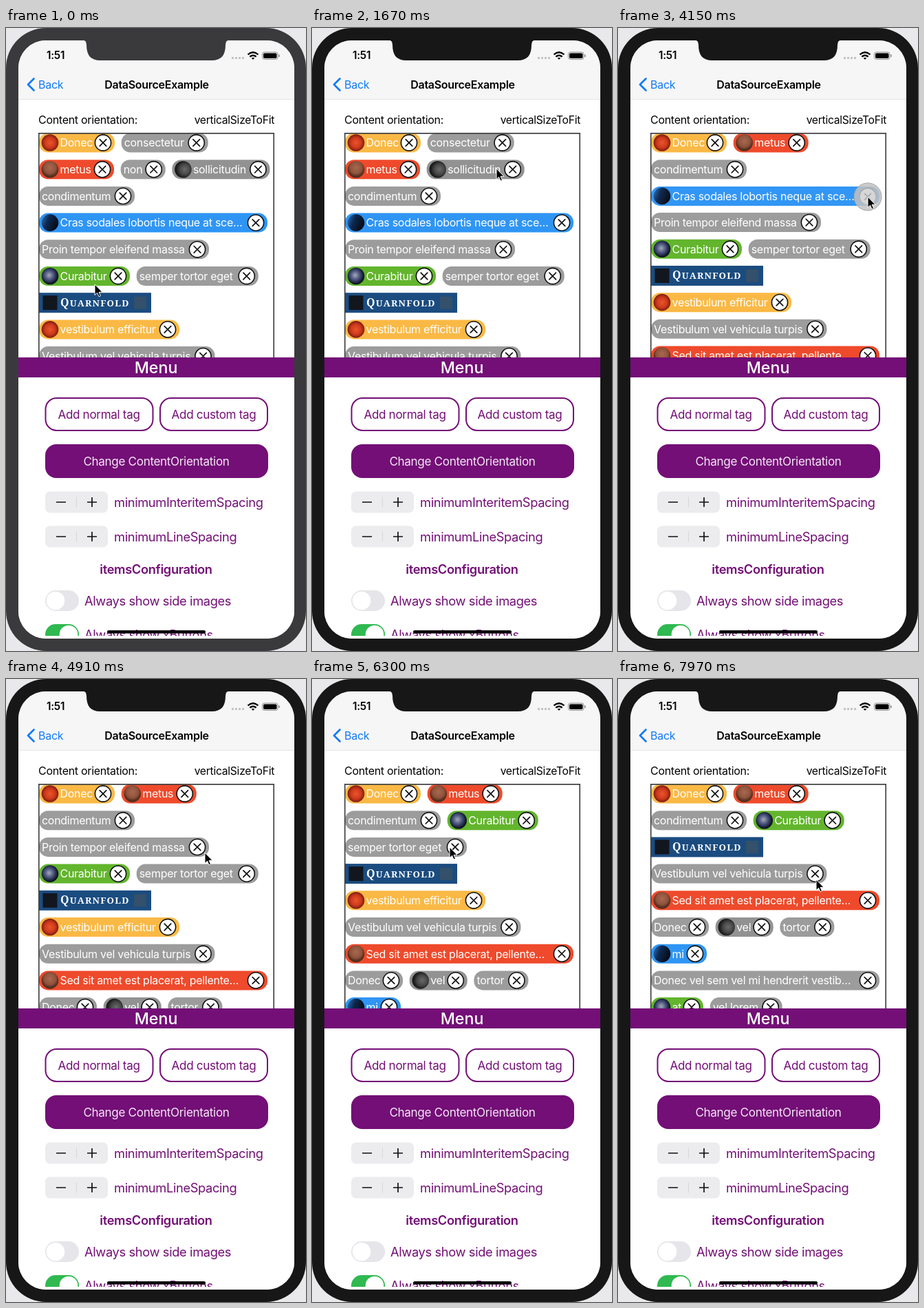
An HTML page for the animation above (8000 ms loop, 436x904 px).

```html
<!DOCTYPE html>
<html lang="en">
<head>
<meta charset="utf-8">
<title>Tag list demo</title>
<style>
  html, body { margin: 0; width: 100%; height: 100%; overflow: hidden; background: #e9e9eb; }
  svg { display: block; width: 100%; height: 100%; }
  text { font-family: Inter, Roboto, sans-serif; font-size: 16px; letter-spacing: -.018em; }
  .purple { fill: #730f76; }
  .outline { fill: none; stroke: #730f76; stroke-width: 2; }
  .button { font-size: 17.1px; letter-spacing: -.02em; text-anchor: middle; }
  .option { font-size: 18.3px; letter-spacing: -.02em; }
  .bold { font-weight: 600; }
  .mid { text-anchor: middle; }
  .tag text { fill: #fff; }
  .tag .brand { font-family: "Noto Serif", serif; font-weight: 600; font-size: 13.3px; letter-spacing: 1.2px; }
  .bezel { fill: #171718; animation: tone 8s linear infinite; }
  @keyframes tone { 0% { fill: #3a3a3c; } 10%, 100% { fill: #171718; } }
</style>
</head>
<body>
<svg viewBox="0 0 436 904" xmlns="http://www.w3.org/2000/svg">
  <defs>
    <clipPath id="screen"><rect x="18" y="18" width="401" height="868" rx="40"/></clipPath>
    <clipPath id="list"><rect x="48" y="152.5" width="341" height="326"/></clipPath>
    <clipPath id="options"><rect x="18" y="507" width="401" height="375"/></clipPath>
    <radialGradient id="sun"><stop offset="0" stop-color="#e8552c"/><stop offset=".6" stop-color="#cf3a1c"/><stop offset="1" stop-color="#7d1c10"/></radialGradient>
    <radialGradient id="mars" cy=".4"><stop offset="0" stop-color="#a8694f"/><stop offset=".7" stop-color="#8f523c"/><stop offset="1" stop-color="#54301f"/></radialGradient>
    <radialGradient id="moon" cx=".6"><stop offset="0" stop-color="#6a6a6a"/><stop offset=".6" stop-color="#474747"/><stop offset="1" stop-color="#1c1c1c"/></radialGradient>
    <linearGradient id="ice" y2=".4"><stop offset="0" stop-color="#2f78c8"/><stop offset=".45" stop-color="#0d2850"/><stop offset="1" stop-color="#070d18"/></linearGradient>
    <radialGradient id="earth" cx=".45" cy=".45"><stop offset="0" stop-color="#a6a9b8"/><stop offset=".55" stop-color="#47527c"/><stop offset="1" stop-color="#101526"/></radialGradient>
    <g id="close">
      <circle r="11.6" fill="#fff" stroke="#111" stroke-width="1.6"/>
      <path d="M-4.8-4.8 4.8 4.8M4.8-4.8-4.8 4.8" stroke="#111" stroke-width="1.7" stroke-linecap="round"/>
    </g>
    <g id="stepper">
      <rect width="91" height="31" rx="7" fill="#ececee"/>
      <path d="M45.5 8v15" stroke="#d6d6d9"/>
      <path d="M16 15.5h14M61 15.5h14M68 8.5v14" stroke="#111" stroke-width="1.7"/>
    </g>
  </defs>

  <rect width="436" height="904" fill="#e9e9eb"/>
  <rect class="bezel" width="436" height="904" rx="58"/>

  <g clip-path="url(#screen)">
    <rect x="18" y="18" width="401" height="868" fill="#fff"/>
    <rect x="18" y="18" width="401" height="85.5" fill="#f6f6f7"/>
    <path d="M18 103.5h401" stroke="#dededf" stroke-width=".7"/>
    <text class="bold" x="59" y="45" style="font-size:15.3px">1:51</text>
    <path d="M328 43.500h19" stroke="#c4c4c6" stroke-width="3" stroke-dasharray="3 2"/>
    <g fill="none" stroke="#000" stroke-width="2.3">
      <path d="M351.5 38.5q7.5-6.5 15 0M354.3 41.7q4.7-4 9.4 0"/>
      <path d="M357.3 43.5h3.4l-1.7 2z" fill="#000" stroke-width=".8"/>
    </g>
    <rect x="372.5" y="35" width="22.5" height="10.5" rx="3" fill="none" stroke="#8d8d8f"/>
    <rect x="374" y="36.5" width="19.5" height="7.5" rx="1.8" fill="#000"/>
    <path d="M397 38.5v3.5" stroke="#8d8d8f" stroke-width="1.5"/>
    <path d="M40.5 73.5 32 82l8.5 8.5" fill="none" stroke="#127af6" stroke-width="2.7" stroke-linecap="round" stroke-linejoin="round"/>
    <text x="47" y="88" fill="#127af6">Back</text>
    <text class="bold mid" x="219" y="88">DataSourceExample</text>
    <text x="47" y="138.5">Content orientation:</text>
    <text x="390" y="138.5" text-anchor="end" style="font-size:15.7px">verticalSizeToFit</text>

    <g id="tags" clip-path="url(#list)"></g>
    <path d="M47.8 479V152.8H389.2V479" fill="none" stroke="#444" stroke-width="1.7"/>

    <rect x="18" y="478" width="401" height="408" fill="#fff"/>
    <rect class="purple" x="18" y="478" width="401" height="29"/>
    <text class="mid" x="218" y="501" fill="#fff" style="font-size:23.2px;font-weight:500;letter-spacing:0">Menu</text>

    <g clip-path="url(#options)">
      <rect class="outline" x="57.5" y="537" width="156" height="47" rx="16"/>
      <rect class="outline" x="224" y="537" width="156" height="47" rx="16"/>
      <rect class="purple" x="57" y="604" width="324" height="49" rx="16"/>
      <text class="button purple" x="135" y="567">Add normal tag</text>
      <text class="button purple" x="302" y="567">Add custom tag</text>
      <text class="button" x="218.5" y="635" fill="#f4e6f5">Change ContentOrientation</text>
      <use href="#stepper" x="57" y="672.5"/>
      <use href="#stepper" x="57" y="722.5"/>
      <text class="option purple" x="157" y="694.5">minimumInteritemSpacing</text>
      <text class="option purple" x="157" y="744.5">minimumLineSpacing</text>
      <text class="option purple bold mid" x="218" y="791.5">itemsConfiguration</text>
      <rect x="57" y="816" width="49" height="30" rx="15" fill="#e5e5ea"/>
      <circle cx="72" cy="831" r="13.3" fill="#fff"/>
      <text class="option purple" x="114" y="837.5">Always show side images</text>
      <rect x="57" y="865" width="49" height="30" rx="15" fill="#2fb950"/>
      <circle cx="91" cy="880" r="13.3" fill="#fff"/>
      <text class="option purple" x="114" y="886.5">Always show xButtons</text>
    </g>
    <rect x="147" y="874" width="143" height="4.5" rx="2.2" fill="#000"/>
  </g>

  <path class="bezel" d="M111 17.5q6 0 6 7c0 15 6 22.5 20 22.5H299c14 0 20-7.5 20-22.5q0-7 6-7z"/>

  <g id="press" opacity="0">
    <circle r="20" fill="#c2c2c2" fill-opacity=".85" stroke="#a5a5a5"/>
    <circle r="11.5" fill="#dadada" fill-opacity=".8"/>
    <path d="M-4.8-4.8 4.8 4.8M4.8-4.8-4.8 4.8" stroke="#a8a8a8" stroke-width="1.6"/>
  </g>
  <path id="cursor" d="M0 0V15.5L3.6 12.2 6 17.8 8.5 16.7 6.1 11.3H11z" fill="#000" stroke="#fff"/>
</svg>

<script>
const LOOP = 8000, LEFT = 48, RIGHT = 390, FIRST_ROW = 166.5, PITCH = 38.7, GAP = 9.7, SHIFT = 300;

const kinds = {
  plain: { fill: '#9c9c9d' },
  sun:   { fill: '#fab945', image: true },
  mars:  { fill: '#ee4a2b', image: true },
  moon:  { fill: '#929293', image: true },
  ice:   { fill: '#2f95f4', image: true },
  earth: { fill: '#62b52c', image: true },
  brand: { fill: '#1b4c80' }
};

const tags = [
  ['Donec', 110, 'sun'], ['consectetur', 126, 'plain'], ['metus', 109, 'mars'],
  ['non', 65, 'plain'], ['sollicitudin', 142, 'moon'], ['condimentum', 139, 'plain'],
  ['Cras sodales lobortis neque at sce…', 332, 'ice'], ['Proin tempor eleifend massa', 247, 'plain'],
  ['Curabitur', 132, 'earth'], ['semper tortor eget', 177, 'plain'], ['Quarnfold', 163, 'brand'],
  ['vestibulum efficitur', 204, 'sun'], ['Vestibulum vel vehicula turpis', 255.5, 'plain'],
  ['Sed sit amet est placerat, pellente…', 332, 'mars'], ['Donec', 84, 'plain'], ['vel', 84, 'moon'],
  ['tortor', 79, 'plain'], ['mi', 81, 'ice'], ['Donec vel sem vel mi hendrerit vestib…', 332, 'plain'],
  ['at', 76, 'earth'], ['vel lorem', 105, 'plain']
].map(([label, width, kind]) => ({ label, width, kind }));

// Tag index and the time its close button is released.
const removals = [[3, 850], [4, 1950], [1, 3000], [6, 4130], [7, 5260], [9, 6390], [11, 7510]];

// Time, x, y of the pointer tip.
const pointer = [
  [0, 129, 372], [100, 129, 372], [680, 213, 205], [1200, 213, 205], [1670, 268, 204],
  [1800, 290, 206], [2250, 290, 206], [2760, 278, 167], [3300, 278, 167], [3920, 363, 245],
  [4400, 363, 245], [4910, 289, 252], [5080, 279, 246], [5600, 279, 246], [6200, 200, 244],
  [6800, 200, 244], [7300, 236, 283], [7640, 236, 283], [7960, 288, 291], [8000, 288, 291]
];

const byId = id => document.getElementById(id);
const clamp = v => Math.min(1, Math.max(0, v));
const ease = v => v * v * (3 - 2 * v);
const mix = (a, b, v) => a + (b - a) * v;

function tagMarkup({ label, width, kind }) {
  const { fill, image } = kinds[kind];
  if (kind === 'brand') {
    return `<rect y="-14.5" width="${width}" height="29" fill="${fill}"/>
      <rect x="5.5" y="-10.5" width="21" height="21" fill="#12161e"/>
      <text class="brand" x="31" y="5"><tspan font-size="16">${label[0]}</tspan>${label.slice(1).toUpperCase()}</text>
      <rect x="138" y="-9" width="18" height="18" fill="#34506a"/>`;
  }
  return `<rect y="-14" width="${width}" height="28" rx="13" fill="${fill}"/>
    ${image ? `<circle cx="16" r="12.3" fill="url(#${kind})"/>` : ''}
    <text x="${image ? 30.5 : 4}" y="5.8">${label}</text>
    <use href="#close" x="${width - 17}"/>`;
}

function flow(gone) {
  let x = LEFT, row = 0;
  return tags.map(({ width }, i) => {
    if (gone.includes(i)) return null;
    if (x > LEFT && x + width > RIGHT) { x = LEFT; row++; }
    const place = { x, y: FIRST_ROW + row * PITCH };
    x += width + GAP;
    return place;
  });
}

const order = removals.map(r => r[0]);
const layouts = [...Array(order.length + 1).keys()].map(n => flow(order.slice(0, n)));

byId('tags').innerHTML = tags.map(t => `<g class="tag">${tagMarkup(t)}</g>`).join('');
const nodes = [...byId('tags').children];

function drawTags(t) {
  const done = removals.filter(r => t >= r[1]).length;
  const v = done ? ease(clamp((t - removals[done - 1][1]) / SHIFT)) : 1;
  const before = layouts[Math.max(0, done - 1)], after = layouts[done];
  nodes.forEach((node, i) => {
    const a = before[i], b = after[i] || a;
    node.setAttribute('opacity', after[i] ? 1 : a ? 1 - v : 0);
    if (a) node.setAttribute('transform', `translate(${mix(a.x, b.x, v)} ${mix(a.y, b.y, v)})`);
  });
}

function drawPress(t) {
  const n = removals.findIndex(([, at]) => t >= at - 80 && t < at + 40);
  byId('press').setAttribute('opacity', n < 0 ? 0 : 1);
  if (n < 0) return;
  const i = order[n], { x, y } = layouts[n][i];
  byId('press').setAttribute('transform', `translate(${x + tags[i].width - 17} ${y + 1})`);
}

function drawCursor(t) {
  const n = Math.max(1, pointer.findIndex(p => p[0] > t));
  const [t0, x0, y0] = pointer[n - 1], [t1, x1, y1] = pointer[n];
  const v = ease(clamp((t - t0) / (t1 - t0)));
  byId('cursor').setAttribute('transform', `translate(${mix(x0, x1, v)} ${mix(y0, y1, v)})`);
}

function frame(now) {
  const t = now % LOOP;
  drawTags(t);
  drawPress(t);
  drawCursor(t);
  requestAnimationFrame(frame);
}
frame(performance.now());
</script>
</body>
</html>
```
